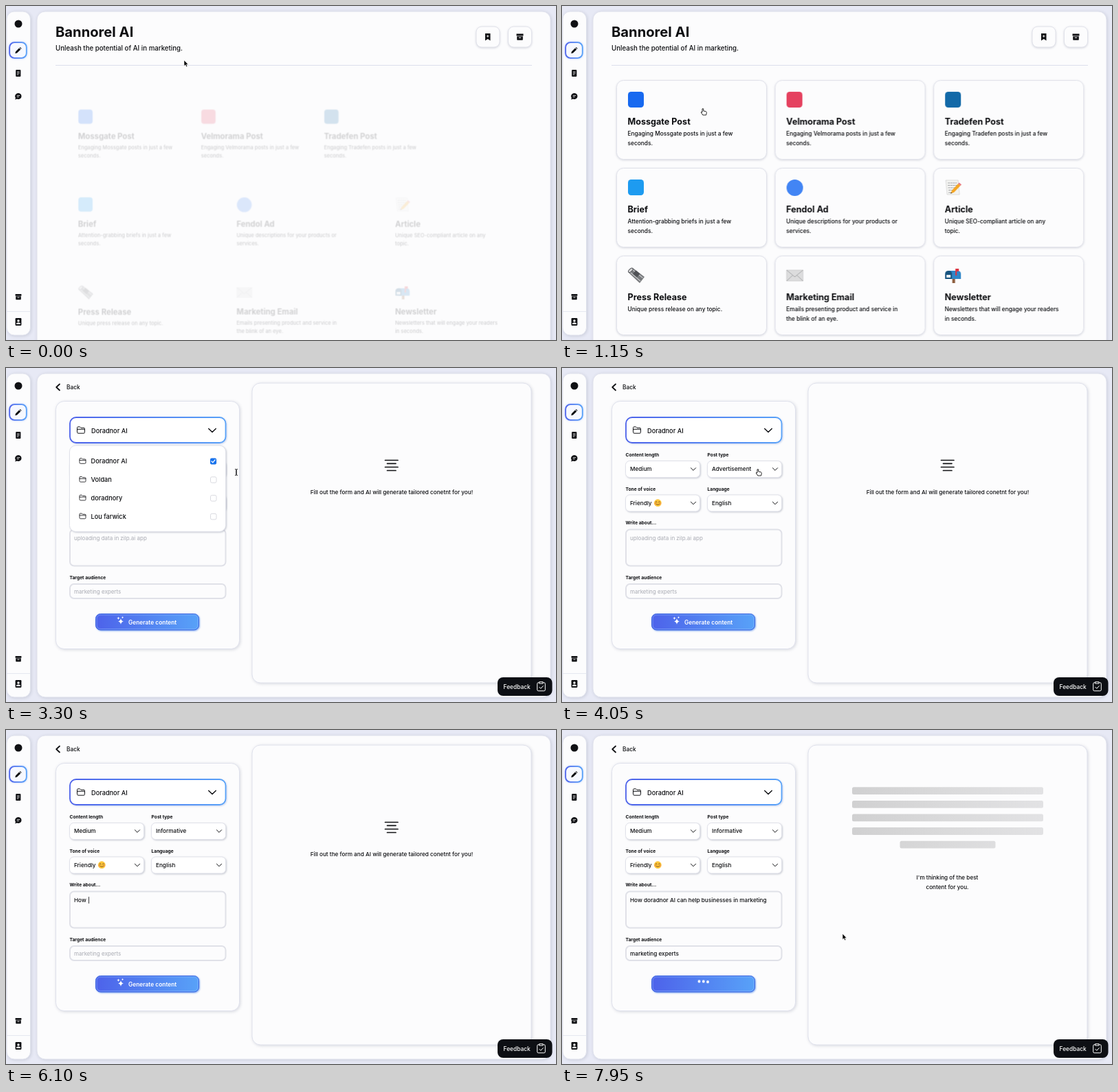
Write an HTML page that moves like this. It is 800 px wide and 487 px high and loops after 8000 ms.

```html
<!DOCTYPE html>
<html lang="en">
<head>
<meta charset="utf-8">
<title>Content generator</title>
<style>
  html, body { margin: 0; width: 100%; height: 100%; overflow: hidden; background: #e7e9f5; }
  svg { display: block; width: 100vw; height: 100vh; }
  text { font: 500 8.2px Inter, "Open Sans", sans-serif; fill: #0c0d10; }
  .title { font-size: 20.2px; font-weight: 700; }
  .sub { font-size: 9.7px; }
  .head { font-size: 12.6px; font-weight: 700; }
  .desc { font-size: 8.35px; }
  .label { font-size: 6.7px; font-weight: 700; }
  .big { font-size: 9.2px; }
  .button { font-size: 8.4px; }
  .opt { font-size: 7px; }
  .hint { font-size: 8px; font-weight: 400; fill: #a9abb3; }
  .white { fill: #fff; }
  .mid { text-anchor: middle; }
  .line { fill: none; stroke: #101114; stroke-linecap: round; stroke-linejoin: round; }
  .panel { fill: #fcfcfd; stroke: #dfe1ec; filter: drop-shadow(1.5px 1.5px 2px #a4a8b870); }
  .plate { fill: #fcfcfd; stroke: #e1e2ea; filter: drop-shadow(.5px 1px 1.5px #a4a8b870); }
  .raised { fill: #fff; stroke: #e1e2ea; filter: drop-shadow(1px 1px 1px #a2a6b590); }
  .inset { fill: #fcfcfd; stroke: #e0e1e8; stroke-width: 2; }

  .card, .card .plate, .leave, .form, .cursor { animation: 8s linear infinite; }
  .card { animation-name: enter; transform-box: fill-box; transform-origin: center; }
  @keyframes enter {
    0% { opacity: .17; transform: translate(var(--dx), 22px) scale(.9); animation-timing-function: ease-out; }
    4.4%, 100% { opacity: 1; transform: none; }
  }
  .card .plate { animation-name: outline; }
  @keyframes outline { 0% { opacity: 0; } 4.4%, 100% { opacity: 1; } }
  .leave { animation-name: leave; }
  @keyframes leave { 0%, 15.6% { opacity: 1; } 17.2%, 100% { opacity: 0; } }
  .form { animation-name: arrive; }
  @keyframes arrive { 0%, 17.2% { opacity: 0; } 19.5%, 100% { opacity: 1; } }
  .cursor { animation-name: travel; animation-timing-function: ease-in-out; }
  @keyframes travel {
    0%, 8.75% { transform: translate(259px, 79px); }
    14.4%, 17% { transform: translate(205px, 150px); }
    23.75% { transform: translate(200px, 126px); }
    27.5%, 29.4% { transform: translate(230px, 92px); }
    33.75%, 36.8% { transform: translate(301px, 136px); }
    41.25%, 43.1% { transform: translate(335px, 152px); }
    49.4%, 52% { transform: translate(285px, 148px); }
    59%, 62.5% { transform: translate(257px, 189px); }
    67.5%, 88.5% { transform: translate(150px, 256px); }
    93%, 94.5% { transform: translate(205px, 369px); }
    98.8%, 100% { transform: translate(408px, 297px); }
  }
  .dot { fill: #fff; animation: bounce .6s ease-in-out infinite alternate; }
  @keyframes bounce { from { transform: translateY(-1.5px); } to { transform: translateY(1.5px); } }
</style>
</head>
<body>
<svg viewBox="0 0 800 487" preserveAspectRatio="none">
  <defs>
    <linearGradient id="blue"><stop stop-color="#4d62ea"/><stop offset="1" stop-color="#58a2f8"/></linearGradient>
    <linearGradient id="bone" gradientUnits="userSpaceOnUse" x1="422" x2="700" spreadMethod="reflect">
      <stop stop-color="#d0d0d1"/><stop offset=".5" stop-color="#dadadb"/><stop offset="1" stop-color="#e2e2e4"/>
    </linearGradient>
    <g id="archive"><path d="M-5-4.5H5v3H-5zM-4.3-.8h8.6V4q0 .8-.8.8h-7q-.8 0-.8-.8z" fill="#101114"/><path d="M-1.6 1.2h3.2" stroke="#fff"/></g>
    <path id="folder" class="line" d="M-5.5-3.5q0-1.2 1.2-1.2h2.8l1.5 1.5h4q1.5 0 1.5 1.3v5q0 1.6-1.6 1.6h-7.8q-1.6 0-1.6-1.6zM-5.5-1.2H5.3"/>
    <path id="chevron" class="line" d="M-3.6-1.8 0 1.8 3.6-1.8"/>
  </defs>

  <rect width="800" height="487" fill="#e7e9f5"/>
  <g id="sidebar">
    <rect class="panel" x="1" y="8" width="34.5" height="472" rx="11"/>
    <circle cx="18" cy="26" r="5.5" fill="#101114"/>
    <rect x="5.2" y="53.2" width="24.6" height="22.6" rx="7" fill="#f6f8ff" stroke="url(#blue)" stroke-width="1.8" style="filter:drop-shadow(0 0 1.5px #6f9cff80)"/>
    <path d="M13.3 69.3l.7-2.8 5.2-5.2 2.1 2.1-5.2 5.2zM19.8 60.7l.8-.8 2.1 2.1-.8.8z" fill="#101114"/>
    <rect x="14.2" y="93" width="7.2" height="10" rx="1" fill="#101114"/>
    <path d="M16 96h3.6M16 98h3.6M16 100h2.3" stroke="#fff" stroke-width=".8"/>
    <path d="M18 127c6 0 6 9 0 9q-1 0-2-.4l-2.8 1 .8-2.5c-2.2-3 .2-7.1 4-7.1z" fill="#101114"/>
    <path d="M15.8 130.5h4.4M15.8 132.5h3" stroke="#fff" stroke-width=".8"/>
    <use href="#archive" transform="translate(18 424) scale(.88)"/>
    <path d="M1 445.5h34" stroke="#e5e7f0"/>
    <rect x="13.6" y="455" width="8.8" height="11" rx="1.2" fill="#101114"/>
    <circle cx="18" cy="459" r="1.7" fill="#fff"/><path d="M15 464q0-2.4 3-2.4t3 2.4z" fill="#fff"/>
  </g>

  <g data-show="0-1400">
    <rect class="panel" x="45" y="8" width="747" height="500" rx="12"/>
    <g class="leave">
      <text class="title" x="72" y="45">Bannorel AI</text>
      <text class="sub" x="72" y="64.5">Unleash the potential of AI in marketing.</text>
      <path d="M72 86.5h693" stroke="#dcdfec"/>
      <rect class="plate" x="684" y="30" width="34" height="30" rx="8"/>
      <path d="M697 40h7.5v10.5l-3.75-2.5-3.75 2.5z" fill="#101114"/><path d="M700.75 42.3v3.4m-1.7-1.7h3.4" stroke="#fff" stroke-width=".9"/>
      <rect class="plate" x="730.5" y="30" width="34" height="30" rx="8"/>
      <use href="#archive" x="747.5" y="45"/>
      <g id="cards"></g>
    </g>
  </g>

  <g data-show="1400-8000">
    <rect class="panel" x="45" y="8" width="747" height="472" rx="12"/>
    <g class="form">
      <path class="line" d="M78 23.5 73.2 28l4.8 4.5" stroke-width="1.8"/>
      <text class="button" x="88" y="31">Back</text>
      <rect class="panel" x="72.5" y="48.5" width="267" height="361" rx="12"/>
      <rect class="panel" x="358" y="22" width="406" height="437" rx="12"/>

      <rect x="93" y="72" width="226.5" height="37" rx="9" fill="#fff" stroke="url(#blue)" stroke-width="1.8" style="filter:drop-shadow(1px 1px 1px #8fa8e080)"/>
      <use href="#folder" x="109" y="90.5"/>
      <text class="big" x="124" y="94.5" data-show="1400-2850">Choose uploaded assets...</text>
      <text class="big" x="124" y="94.5" data-show="2850-8000">Doradnor AI</text>
      <use href="#chevron" transform="translate(300 91) scale(1.45)"/>

      <g id="fields"></g>
      <g transform="translate(139.3 196.7)">
        <circle r="5.4" fill="#fcc53a"/>
        <path class="line" d="M-3.3-1.2q1-1.6 2.2 0M1.1-1.2q1.2-1.6 2.2 0M-2.7 1.3q2.7 2.8 5.4 0" style="stroke:#80501c"/>
        <circle cx="-3.7" cy="1" r="1" fill="#f58d4a"/><circle cx="3.7" cy="1" r="1" fill="#f58d4a"/>
      </g>

      <text class="label" x="92.5" y="228">Write about...</text>
      <rect class="inset" x="93" y="235.5" width="226.5" height="53" rx="6"/>
      <text class="hint" x="99" y="251" data-show="1400-6010">uploading data in zilp.ai app</text>
      <text id="topic" x="99" y="251"></text>
      <text class="label" x="92.5" y="308">Target audience</text>
      <rect class="inset" x="93" y="315" width="226.5" height="21" rx="6"/>
      <text class="hint" x="99" y="328.5" data-show="1400-7030">marketing experts</text>
      <text id="audience" x="99" y="328.5"></text>

      <rect x="130.5" y="358.5" width="150" height="23.5" rx="7" fill="url(#blue)" stroke="#3f66df" style="filter:drop-shadow(1.5px 1.5px 1px #86aef0)"/>
      <rect x="132" y="360" width="147" height="20.5" rx="5.5" fill="none" stroke="#8db6ff" stroke-opacity=".55"/>
      <g data-show="1400-7600">
        <path d="M167 365q.6 3.6 4 4.5-3.4.9-4 4.5-.6-3.6-4-4.5 3.4-.9 4-4.5zM163.5 362.5l.6 1.7 1.7.6-1.7.6-.6 1.7-.6-1.7-1.7-.6 1.7-.6zM169.5 362l.5 1.3 1.3.5-1.3.5-.5 1.3-.5-1.3-1.3-.5 1.3-.5z" fill="#fff"/>
        <text class="button white" x="178" y="373.5" style="font-weight:600">Generate content</text>
      </g>
      <g data-show="7600-8000">
        <circle class="dot" cx="199.5" cy="368" r="2" style="animation-delay:-.5s"/>
        <circle class="dot" cx="205.8" cy="368" r="2" style="animation-delay:-.37s"/>
        <circle class="dot" cx="212" cy="368" r="2" style="animation-delay:-.24s"/>
      </g>

      <g data-show="1400-7600">
        <path class="line" d="M551.5 134.5h18.5M554.5 139.3h12.5M551.5 144.5h18.5M554.5 149.5h12.5" stroke-width="1.7"/>
        <text class="mid" x="561" y="183.5">Fill out the form and AI will generate tailored conetnt for you!</text>
      </g>
      <g data-show="7600-8000">
        <g id="bones" fill="url(#bone)"></g>
        <text class="mid" x="560.5" y="218">I'm thinking of the best</text>
        <text class="mid" x="560.5" y="231.5">content for you.</text>
      </g>

      <g data-show="2300-3480">
        <rect class="raised" x="92.5" y="113" width="227" height="125.5" rx="9"/>
        <g id="assets"></g>
        <g data-show="2850-3480">
          <rect x="297" y="131.5" width="9" height="9" rx="2" fill="#1673ee"/>
          <path class="line" d="M299 136l1.8 1.9 3.3-4" style="stroke:#fff" stroke-width="1.3"/>
        </g>
      </g>
      <g data-show="4150-5000">
        <rect class="raised" x="211.5" y="162.5" width="108.5" height="86" rx="5"/>
        <rect x="212" y="185" width="107.5" height="20" fill="#dcdee3" data-show="4650-5000"/>
        <g id="types"></g>
      </g>

      <rect x="715" y="451" width="79.5" height="27" rx="8" fill="#0d0f14"/>
      <text class="button white" x="723.5" y="468">Feedback</text>
      <path class="line" d="M775.5 458.8h-1.2q-1.6 0-1.6 1.6v8.8q0 1.6 1.6 1.6h8.4q1.6 0 1.6-1.6v-8.8q0-1.6-1.6-1.6h-1.2M776 457.7h5v2.3h-5zM775.8 465.3l2 2 3.5-3.7" style="stroke:#fff"/>
    </g>
  </g>

  <g class="cursor" stroke-linejoin="round">
    <path data-show="0-950 1400-2130 3560-3880 7650-8000" d="M0 0v8.5l2-1.7 1.3 3 1.5-.7L3.5 6.2H6z" fill="#000" stroke="#fff" stroke-width=".6"/>
    <path data-show="950-1400 2130-3080 3880-5200 7250-7650" d="M-1 0q1-1 1.8 0v3l3.5.8q1.2.4 1 2l-.7 3.2h-4.8l-2.6-4q.2-1.3 1.8 0z" fill="#fff" stroke="#111" stroke-width=".9"/>
    <path data-show="3080-3560 5200-6010" class="line" d="M-1.5-4.5Q0-4.5 0-3.5v7q0 1-1.5 1M1.5-4.5Q0-4.5 0-3.5v7q0 1 1.5 1"/>
  </g>
</svg>
<script>
  const $ = id => document.getElementById(id);
  const LOOP = 8000;
  const badge = color => `<rect width="23" height="23" rx="4.5" fill="${color}"/>`;

  const article = `<path d="M1 1h18l2 21H3z" fill="#f3f3f1" stroke="#c9c9c9" stroke-width=".6"/>
    <path d="M4 5h13M4 8.5h13M4.5 12h10M5 15.5h7M5 19h5" stroke="#8b8d92" stroke-width=".8" stroke-dasharray="3 .7"/>
    <path d="M8 20.5l2-4.8L19 6l3.3 3L13 18.7z" fill="#f5a623"/><path d="M19 6l1.5-1.5 3.3 3L22.3 9z" fill="#e8727d"/><path d="M8 20.5l.8-2 1.4 1.2z" fill="#333"/>`;
  const press = `<path d="M0 7l7-6 17 13-7 9z" fill="#77797c"/><path d="M3 7L18 20M6.5 3.5l15 12" stroke="#c5c6c8" stroke-width="1.2"/>
    <path d="M7 9.5l4.5-5 6 5-4.5 5z" fill="#505256"/><ellipse cx="3.8" cy="4.3" rx="2" ry="4" transform="rotate(48 3.8 4.3)" fill="#d7d7d8" stroke="#55575b"/>`;
  const email = `<path d="M0 4h24v16H0z" fill="#dcdcdd" stroke="#c4c4c6" stroke-width=".6"/><path d="M0 20l9-8.5M24 20l-9-8.5M0 4l12 10L24 4" fill="none" stroke="#aaabad"/>`;
  const mailbox = `<path d="M10.5 15h4v8h-4z" fill="#8a5a3a"/><path d="M5 5h13q5 0 5 5v7H5z" fill="#2e86c8"/>
    <path d="M0 10q0-5 5-5t5 5v7H0z" fill="#17537f"/><path d="M2 11h6v4H2z" fill="#e8eef2"/><path d="M15 12V2h5v4h-3v6z" fill="#dc3340"/>`;

  const cards = [
    ["Mossgate Post", "Engaging Mossgate posts in just a few", "seconds.", badge("#1769f0")],
    ["Velmorama Post", "Engaging Velmorama posts in just a few", "seconds.", badge("#e5415f")],
    ["Tradefen Post", "Engaging Tradefen posts in just a few", "seconds.", badge("#1269a8")],
    ["Brief", "Attention-grabbing briefs in just a few", "seconds.", badge("#1d9bf0")],
    ["Fendol Ad", "Unique descriptions for your products or", "services.", `<circle cx="12" cy="12" r="12" fill="#4285f4"/>`],
    ["Article", "Unique SEO-compliant article on any", "topic.", article],
    ["Press Release", "Unique press release on any topic.", "", press],
    ["Marketing Email", "Emails presenting product and service in", "the blink of an eye.", email],
    ["Newsletter", "Newsletters that will engage your readers", "in seconds.", mailbox],
  ];
  $("cards").innerHTML = cards.map(([name, first, second, icon], i) => {
    const col = i % 3, row = Math.floor(i / 3);
    return `<g transform="translate(${79 + col * 230.6} ${108 + row * 128})">
      <g class="card" style="--dx:${row ? 0 : -52 * col}px">
        <rect class="plate" x=".5" y=".5" width="218" height="115" rx="10"/>
        <g transform="translate(17 17)">${icon}</g>
        <text class="head" x="16.5" y="64.5">${name}</text>
        <text class="desc" x="16.5" y="81.3">${first}</text>
        <text class="desc" x="16.5" y="94.8">${second}</text>
      </g></g>`;
  }).join("");

  const field = (x, y, label, value) => `<text class="label" x="${x + .5}" y="${y - 6}">${label}</text>
    <rect class="raised" x="${x + .5}" y="${y + .5}" width="108" height="24" rx="6"/>
    <text x="${x + 7}" y="${y + 15.3}">${value}</text>
    <use href="#chevron" x="${x + 99}" y="${y + 12.5}"/>`;
  $("fields").innerHTML =
    field(92, 135, "Content length", "Medium") +
    field(211, 135, "Post type", `<tspan id="type"></tspan>`) +
    field(92, 184.5, "Tone of voice", "Friendly") +
    field(211, 184.5, "Language", "English");

  $("bones").innerHTML = [278, 278, 278, 278, 139].map((width, i) =>
    `<rect x="${561 - width / 2}" y="${83.3 + i * 19.6}" width="${width}" height="10.8" rx="2.5"/>`).join("");

  $("assets").innerHTML = ["Doradnor AI", "Voldan", "doradnory", "Lou farwick"].map((name, i) => {
    const y = 135.5 + i * 26.8;
    return `<use href="#folder" transform="translate(111.5 ${y}) scale(.82)"/>
      <text class="big" x="123.5" y="${y + 3.6}">${name}</text>
      <rect x="297.5" y="${y - 3.5}" width="8.5" height="8.5" rx="2" fill="#fff" stroke="#d9dae0"/>`;
  }).join("");
  $("types").innerHTML = ["Educational", "Informative", "Advertisement", "Lifestyle"]
    .map((name, i) => `<text class="opt" x="220.5" y="${177.7 + i * 20}">${name}</text>`).join("");

  const timed = [...document.querySelectorAll("[data-show]")].map(node => ({
    node, spans: node.dataset.show.split(" ").map(span => span.split("-").map(Number)),
  }));

  function type(node, phrase, t, start, pace, end) {
    const count = Math.max(0, Math.floor((t - start) / pace));
    const caret = t >= start && t < end ? "|" : "";
    node.textContent = phrase.slice(0, count) + caret;
  }

  let origin;
  function draw(now) {
    origin ??= now;
    const t = (now - origin) % LOOP;
    for (const { node, spans } of timed)
      node.style.display = spans.some(([from, to]) => t >= from && t < to) ? "" : "none";
    $("type").textContent = t < 5000 ? "Advertisement" : "Informative";
    $("bone").setAttribute("gradientTransform", `translate(${(t - 7950) * .28} 0)`);
    type($("topic"), "How doradnor AI can help businesses in marketing", t, 6010, 20, 7020);
    type($("audience"), "marketing experts", t, 7030, 15, 7400);
    requestAnimationFrame(draw);
  }
  requestAnimationFrame(draw);
</script>
</body>
</html>
```
